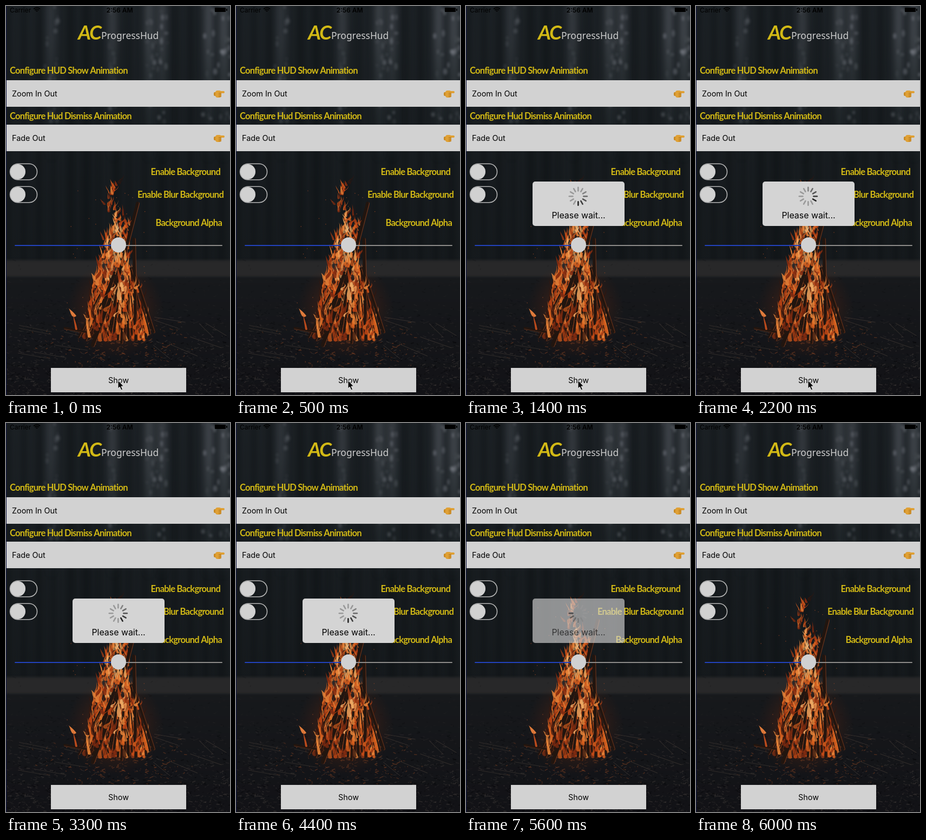
An HTML page with a canvas that plays this animation: 414 px wide and 718 px high, repeating every 6.1 s.

```html
<!DOCTYPE html>
<html lang="en">
<head>
<meta charset="utf-8">
<style>
html, body { margin: 0; width: 100%; height: 100%; overflow: hidden; background: #111; }
canvas { display: block; }
</style>
</head>
<body>
<canvas id="stage" width="414" height="718"></canvas>
<script>
const W = 414, H = 718, LOOP = 6100;
const stage = document.getElementById('stage').getContext('2d');
const scene = document.createElement('canvas');
scene.width = W;
scene.height = H;
let c = scene.getContext('2d');

const clamp = v => Math.max(0, Math.min(1, v));
const smooth = v => v * v * (3 - 2 * v);

let seed = 11;
const rnd = (a = 0, b = 1) => {
  seed = (seed * 1664525 + 1013904223) % 4294967296;
  return a + (b - a) * seed / 4294967296;
};
const pick = list => list[Math.floor(rnd(0, list.length))];

function rect(x, y, w, h, color, r = 0) {
  c.fillStyle = color;
  c.beginPath();
  c.roundRect(x, y, w, h, r);
  c.fill();
}
function ellipse(x, y, rx, ry, color) {
  c.fillStyle = color;
  c.beginPath();
  c.ellipse(x, y, rx, ry, 0, 0, 7);
  c.fill();
}
function line(x1, y1, x2, y2, width, color) {
  c.strokeStyle = color;
  c.lineWidth = width;
  c.beginPath();
  c.moveTo(x1, y1);
  c.lineTo(x2, y2);
  c.stroke();
}
function fade(y1, y2, from, to) {
  const gradient = c.createLinearGradient(0, y1, 0, y2);
  gradient.addColorStop(0, from);
  gradient.addColorStop(1, to);
  return gradient;
}
function text(str, x, y, font, color, align = 'left', spacing = 0) {
  c.font = font;
  c.fillStyle = color;
  c.textAlign = align;
  c.letterSpacing = spacing + 'px';
  c.fillText(str, x, y);
}

function drawForest() {
  const gaps = [84, 198, 264, 288, 374, 402];
  rect(0, 0, W, H, fade(0, 470, '#1d2226', '#171b1e'));

  c.filter = 'blur(6px)';
  for (let x = 0; x < W; x += 28) rect(x, -10, rnd(6, 18), 490, 'rgba(11,14,17,.5)');
  for (const x of gaps) {
    const light = .16 + .22 * x / W;
    rect(x - 9, -10, 18, 310, fade(60, 290, `rgba(130,136,146,${light})`, 'rgba(90,110,115,0)'));
  }
  c.filter = 'blur(2px)';
  for (let i = 0; i < 110; i++) {
    const x = pick(gaps);
    ellipse(x + rnd(-13, 13), rnd(0, 215), rnd(1.5, 4), rnd(2, 7), `rgba(165,168,178,${rnd(.05, .15 + .25 * x / W)})`);
  }

  rect(-9, 469, W + 18, 32, '#282829');
  rect(-9, 501, W + 18, 230, fade(500, H, '#17191c', '#121216'));
  c.filter = 'none';

  for (let i = 0; i < 1900; i++) {
    const y = 470 + 248 * Math.sqrt(rnd()), x = rnd(0, W);
    const lit = rnd() < 1 - Math.hypot(x - 200, 2 * (y - 625)) / 160;
    const tone = lit ? '125,66,36' : pick(['64,58,57', '7,8,10', '44,41,42']);
    line(x, y, x + rnd(-7, 7), y + rnd(-3, 3), rnd(.6, 1.8), `rgba(${tone},${.15 + .4 * clamp((y - 540) / 80)})`);
  }
  for (let i = 0; i < 7; i++) {
    const x = rnd(260, 380), y = rnd(570, 640);
    line(x, y, x + rnd(25, 60), y + rnd(8, 28), 1, '#36302d');
    line(x - 250, y + 15, x - 190, y + rnd(20, 32), 1, '#302c2a');
  }
}

function flame(x, y, length, width, bend, color) {
  c.fillStyle = color;
  c.beginPath();
  c.moveTo(x - width, y);
  c.bezierCurveTo(x - width * 2, y - length * .5, x + bend + width, y - length * .4, x + bend, y - length);
  c.bezierCurveTo(x + bend + width * 2, y - length * .5, x, y - length * .4, x + width, y);
  c.quadraticCurveTo(x, y + width, x - width, y);
  c.fill();
}

// The fire widens downwards; its upper part sways from side to side.
function drawFlames(count, top) {
  const palette = ['#33170f', '#852c10', '#b94315', '#d65f1e', '#e8853a', '#efaa63', '#f3c58c'];
  for (let i = 0; i < count; i++) {
    const y = top + (618 - top) * Math.sqrt(rnd());
    const depth = (y - 315) / 300, off = rnd(-1, 1);
    const sway = 14 * Math.sin((y - 382) / 15) * clamp((445 - y) / 40);
    const core = (1 - Math.abs(off)) * Math.sin(Math.PI * clamp(depth));
    c.globalAlpha = rnd(.6, .95);
    flame(202 + sway + off * (2 + 62 * depth ** 1.2), y, rnd(8, 16 + 22 * depth), rnd(1, 2.5 + 2 * depth),
      rnd(-9, 9), palette[Math.floor(rnd(0, 4.6) + 2.4 * core)]);
  }
  c.globalAlpha = 1;
}

function log(x1, y1, x2, y2, width) {
  line(x1 + 1, y1 + 1, x2 + 1, y2, width, 'rgba(150,66,28,.6)');
  line(x1, y1, x2, y2, width - .5, '#21150f');
}

function drawFire() {
  const glow = c.createRadialGradient(202, 560, 10, 202, 560, 90);
  glow.addColorStop(0, 'rgba(150,55,18,.5)');
  glow.addColorStop(1, 'rgba(90,35,15,0)');
  c.fillStyle = glow;
  c.fillRect(100, 460, 210, 200);

  drawFlames(460, 312);
  c.lineCap = 'round';
  for (let i = 0; i < 22; i++) {
    const baseX = 134 + i * 6.6, baseY = 622 - rnd(0, 22), reach = rnd(.25, .75);
    log(baseX + (220 - baseX) * reach, baseY + (440 - baseY) * reach, baseX, baseY, rnd(1.5, 5));
  }
  log(243, 364, 208, 500, 6);
  log(208, 500, 160, 626, 7);
  log(236, 430, 240, 616, 6);
  log(108, 594, 160, 604, 4);
  c.lineCap = 'butt';
  drawFlames(130, 400);
  flame(126, 572, 14, 4, -10, '#df7b3b');
  flame(130, 597, 28, 2, -6, '#b94a1c');
  for (let i = 0; i < 40; i++) ellipse(200 + rnd(-90, 90), rnd(310, 610), .7, .7, '#8d4526');
}

function drawHand(y) {
  const skin = '#dfa035';
  rect(384, y - 3, 6, 7, '#c98a22', 2);
  rect(387, y - 6, 11, 13, skin, 4);
  rect(390, y - 5, 14, 4, skin, 2);
  for (let dy = -1; dy < 6; dy += 3) line(393, y + dy, 398, y + dy, 1, '#a96a13');
}

function drawSwitch(y) {
  c.strokeStyle = '#b4b4b4';
  c.lineWidth = 1.6;
  c.beginPath();
  c.roundRect(7.5, y - 14.7, 50, 29.4, 14.7);
  c.stroke();
  ellipse(22, y, 14, 14, '#d1d1d1');
}

function drawControls() {
  const yellow = '#d2b915', plain = '14.4px Inter, sans-serif';
  const label = (str, x, y, align) => text(str, x, y, 'bold 16.5px Lato, sans-serif', yellow, align, -.75);
  const row = (str, y) => {
    rect(1, y, 413, 49, '#d2d2d2');
    text(str, 11, y + 30, plain, '#000');
    drawHand(y + 25);
  };

  text('Carrier', 7, 12, '12px Inter, sans-serif', '#000');
  text('2:56 AM', 210, 12, '600 12px Inter, sans-serif', '#000', 'center');
  rect(386, 3, 20, 8, '#000', 1);
  rect(407, 5, 2, 4, '#000');
  c.strokeStyle = '#000';
  c.lineWidth = 1.6;
  for (let r = 2; r < 9; r += 3) {
    c.beginPath();
    c.arc(57, 11, r, -2.4, -.75);
    c.stroke();
  }

  text('AC', 133, 62, 'italic bold 37px Lato, sans-serif', yellow, 'left', -2);
  text('ProgressHud', 176, 61, '17.4px "Noto Sans", sans-serif', '#cecece');
  label('Configure HUD Show Animation', 7, 125);
  row('Zoom In Out', 137);
  label('Configure Hud Dismiss Animation', 7, 209);
  row('Fade Out', 219);

  drawSwitch(306);
  drawSwitch(348);
  label('Enable Background', 396, 312, 'right');
  label('Enable Blur Background', 402, 354, 'right');
  label('Background Alpha', 399, 406, 'right');

  rect(16, 441, 192, 2, '#2342bd', 1);
  rect(208, 441, 192, 2, '#8d8b89', 1);
  ellipse(208, 441, 14, 14, '#d1d1d1');
  rect(83, 668, 250, 45, '#d2d2d2');
  text('Show', 208, 696, plain, '#000', 'center');
  rect(0, 0, 1, H, '#101442');
}

function drawHud(t, scale, alpha) {
  c.save();
  c.globalAlpha = alpha;
  c.translate(208, 365);
  c.scale(scale, scale);
  rect(-85, -41, 170, 82, '#d4d4d4', 5);
  text('Please wait...', 0, 27, '15.9px Inter, sans-serif', '#000', 'center');
  c.translate(-.7, -13.7);
  c.lineCap = 'round';
  const head = Math.floor(t % 1000 * .012 + 2);
  for (let i = 0; i < 12; i++) {
    const tone = Math.min(153, 35 + (head - i + 12) % 12 * 24);
    line(0, -10, 0, -16.5, 2.6, `rgb(${tone},${tone},${tone})`);
    c.rotate(Math.PI / 6);
  }
  c.restore();
}

function drawCursor() {
  const arrow = new Path2D('M207 691v15l3.3-3 2.7 6 2.5-1-2.5-6h4.5z');
  c.fillStyle = '#000';
  c.strokeStyle = '#e8e8e8';
  c.lineWidth = 1;
  c.fill(arrow);
  c.stroke(arrow);
}

function render(now) {
  const t = Math.floor(now % LOOP / 100) * 100;
  c.drawImage(scene, 0, 0);
  const scale = smooth(clamp((t - 490) / 430));
  const alpha = 1 - smooth(clamp((t - 5400) / 500));
  if (scale > 0 && alpha > 0) drawHud(t, scale, alpha);
  if (t < 2500) drawCursor();
  requestAnimationFrame(() => render(performance.now() - start));
}

drawForest();
drawFire();
drawControls();
c = stage;
const start = performance.now();
render(0);
</script>
</body>
</html>
```
